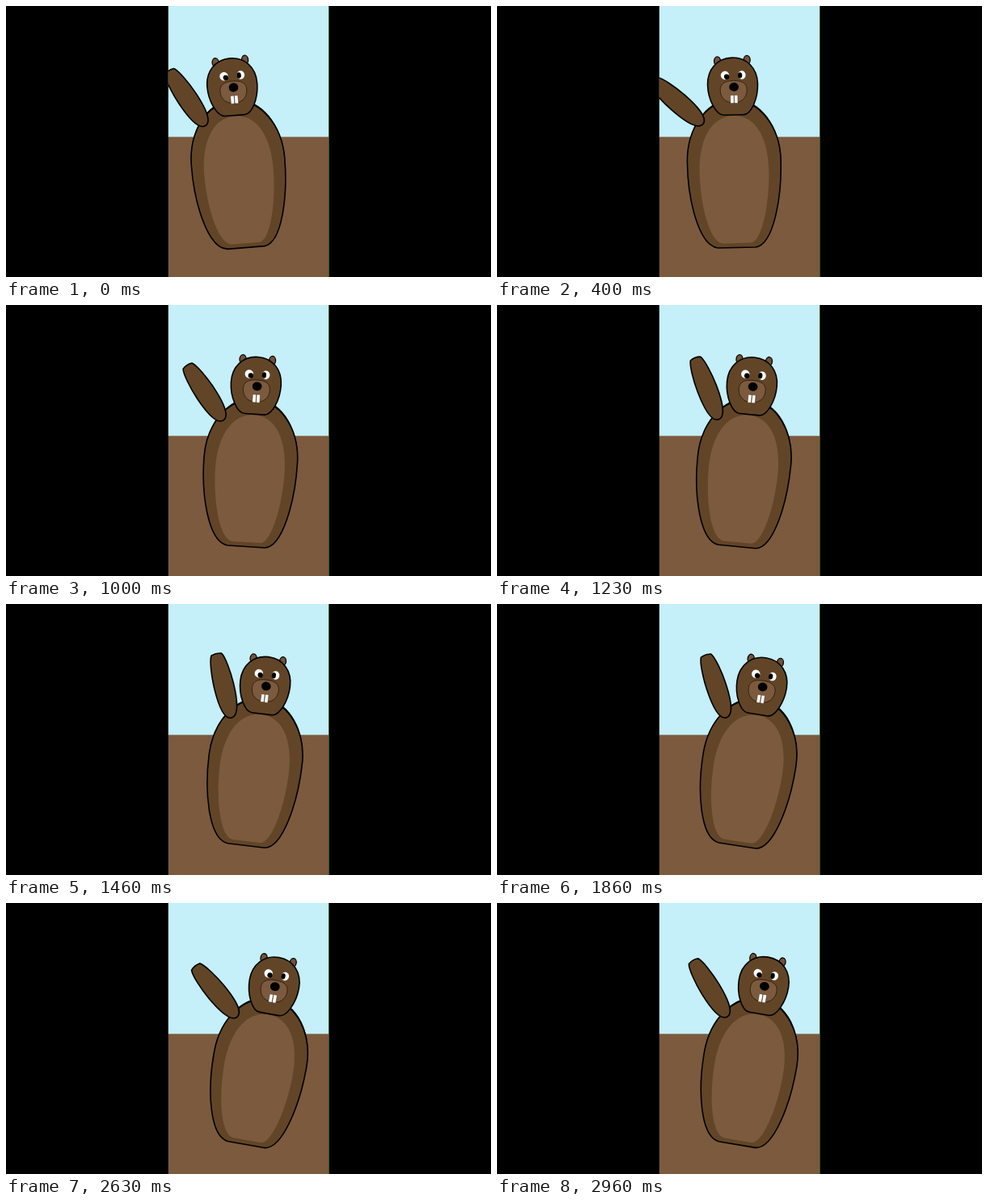
An HTML page for the animation above (3 s loop, 600 px wide and 336 px high).

```html
<!DOCTYPE html>
<html lang="en">
<head>
<meta charset="utf-8">
<title>Waving beaver</title>
<style>
  html, body { margin: 0; width: 100%; height: 100%; overflow: hidden; background: #000; }
  svg { display: block; width: 600px; height: 336px; }
  .fur { fill: #624527; stroke: #000; stroke-width: 1.6; stroke-linejoin: round; }
  .light { fill: #7c5a3e; }
</style>
</head>
<body>
<svg viewBox="0 0 600 336">
  <clipPath id="view"><path d="M200.8 0H399V336H200.8Z"/></clipPath>
  <g clip-path="url(#view)">
    <rect x="200" width="200" height="163" fill="#c5eff9"/>
    <rect class="light" x="200" y="162.3" width="200" height="174"/>
    <g id="beaver">
      <!-- body; the dark shape behind thickens the line at the shoulders -->
      <path d="M237.500 193C237.500 150 262 115 296 115C329 115 354 149 354 193Z"/>
      <path class="fur" d="M274 299.500C250 297 237.500 240 237.800 193C238 150 263 117 296 117C328 117 353.600 150 353.600 193C353.600 240 342 297 320 299.500Z"/>
      <path class="light" d="M280 294C263 293 252.700 245 252.700 205C252.700 165 269 136 296 136C324 136 338.500 165 338.500 205C338.500 245 328 293 314 294Z"/>
      <!-- head -->
      <g transform="translate(.6 0)">
        <g fill="#74523a" stroke="#000" stroke-width="1.3">
          <ellipse cx="277.200" cy="67.900" rx="4" ry="5.500"/>
          <ellipse cx="313.800" cy="67.300" rx="4" ry="5.500"/>
        </g>
        <path class="fur" d="M295.500 64C314 64 326.500 78 326.500 97C326.500 115 318 135 308 135H284C274 135 264.500 115 264.500 97C264.500 78 277 64 295.500 64Z"/>
        <g fill="#fff">
          <circle cx="286.200" cy="85.700" r="5.200"/>
          <ellipse cx="307" cy="85.700" rx="4.800" ry="5.300"/>
        </g>
        <circle cx="288.300" cy="87.500" r="3.200"/>
        <ellipse cx="304.800" cy="86" rx="2.700" ry="3.700"/>
        <path class="light" stroke="#2a1a0c" stroke-width=".8" d="M296.500 92.500C307 92.500 313 96 313 104C313 114 306 120 296.500 120C287 120 280 114 280 104C280 96 286 92.500 296.500 92.500Z"/>
        <ellipse cx="297" cy="100.400" rx="5.900" ry="5.400"/>
        <path fill="#fff" stroke="#443018" stroke-width=".5" d="M292.300 110.500H296.700V120.500H292.300ZM297.100 110.500H301.500V120.500H297.100Z"/>
      </g>
      <g id="arm">
        <path class="fur" d="M-6.500 -85Q0 -87.500 6.500 -85C10 -80 12.300 -60 12.300 -45C12.300 -22 9 -4.300 0 -4.300C-9 -4.300 -12.300 -22 -12.300 -45C-12.300 -60 -10 -80 -6.500 -85Z"/>
      </g>
    </g>
  </g>
  <rect x="399" width="1" height="336" fill="#34541c"/>
</svg>
<script>
  const LOOP = 3000;
  const beaver = document.getElementById('beaver');
  const arm = document.getElementById('arm');
  const rad = deg => deg * Math.PI / 180;
  const start = performance.now();

  function draw() {
    const t = (performance.now() - start) % LOOP;
    // both swings are sine waves that slow down slightly
    const lean = 10.2 * Math.sin(rad(-27 + 0.0497 * t - 1.2e-6 * t * t));
    const wave = -35 + 15 * Math.cos(rad(66.5 + 0.2015 * t - 6.45e-6 * t * t));
    beaver.setAttribute('transform', `rotate(${lean} 297 300)`);
    arm.setAttribute('transform', `translate(261.4 148.5) rotate(${wave})`);
    requestAnimationFrame(draw);
  }
  draw();
</script>
</body>
</html>
```
